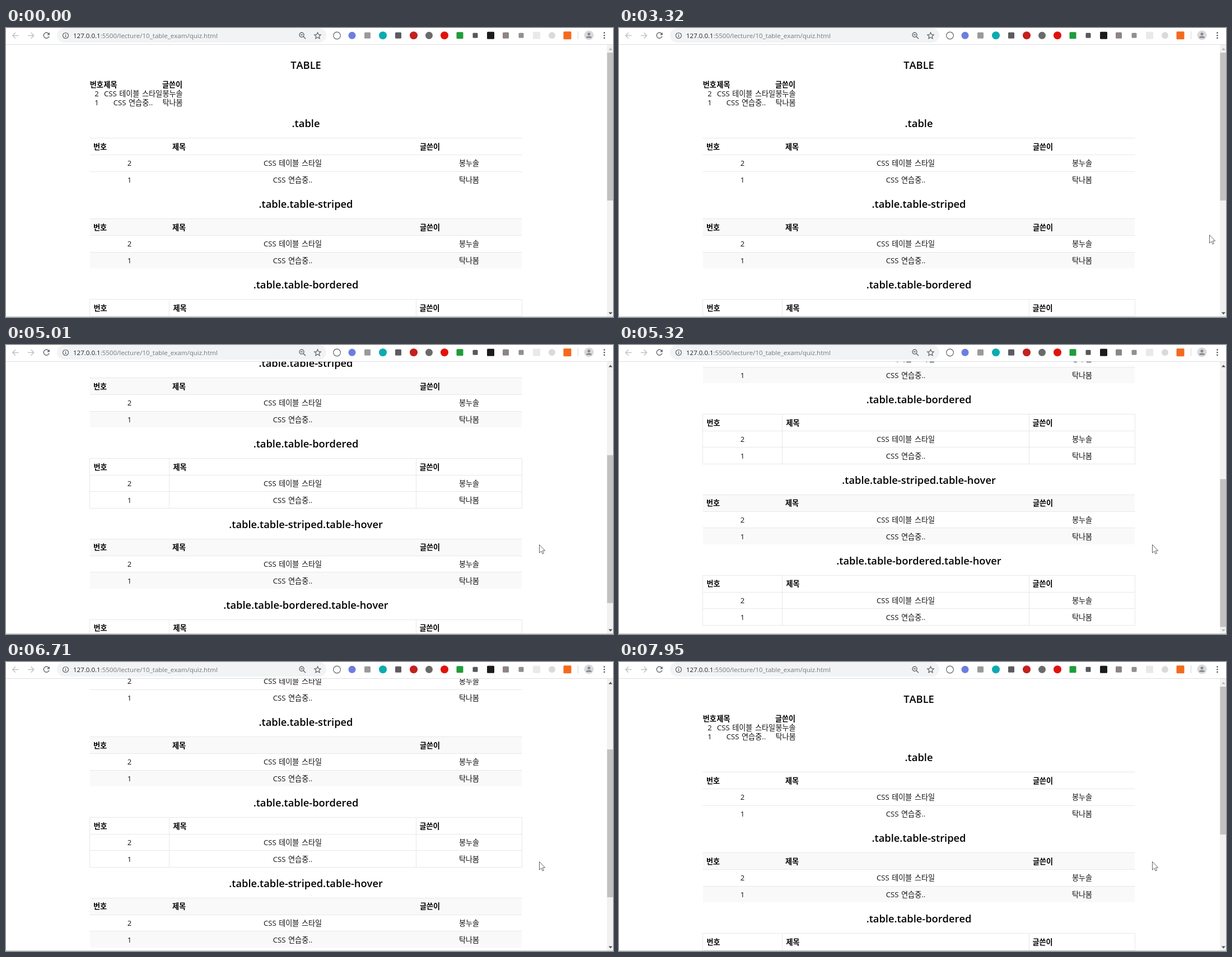
Recreate the animation shown at these times as an HTML page. Size 1084 by 516 pixels, loop 8 s.

```html
<!DOCTYPE html>
<html lang="ko">
<head>
<meta charset="utf-8">
<title>Table quiz</title>
<style>
  @property --s { syntax: "<number>"; inherits: true; initial-value: 0; }

  html, body { margin: 0; width: 100%; height: 100%; overflow: hidden; background: #fff; }
  svg {
    display: block; width: 1084px; height: 516px;
    font: 13.1px "Open Sans", "Noto Sans CJK KR", "Noto Sans CJK JP", sans-serif;
    font-kerning: none;
    fill: #111;
    animation: scroll 8s step-end -1ms infinite;
  }
  text { word-spacing: 1.2px; white-space: pre; }
  .mid { text-anchor: middle; }
  .head { font-weight: 700; fill: #000; }
  .title { font-size: 18.3px; font-weight: 600; text-anchor: middle; fill: #000; }
  .url { font-size: 11.5px; fill: #75797d; word-spacing: 0; }
  .url tspan { fill: #202124; }
  .line { fill: #e8e8e8; }
  .stripe { fill: #f9f9f9; }
  .icon { fill: none; stroke: #5f6368; stroke-width: 1.4; }
  .thin { stroke-width: 1.2; }
  .off { stroke: #bfc1c4; }

  #page { transform: translateY(calc(var(--s) * -1px)); }
  #thumb { transform: translateY(calc(var(--s) * .5415px)); }
  #up { opacity: clamp(.35, var(--s), 1); }
  #down { opacity: clamp(.35, 361 - var(--s), 1); }
  #cursor { animation: point 8s step-end -1ms infinite; }

  @keyframes scroll {
    0% { --s: 0; }
    43.375% { --s: 18; }
    44.3125% { --s: 62; }
    45.25% { --s: 112; }
    46.1875% { --s: 163; }
    47.125% { --s: 210; }
    48.0625% { --s: 243; }
    49% { --s: 257; }
    62.625% { --s: 282; }
    63.6% { --s: 309; }
    64.55% { --s: 334; }
    65.525% { --s: 353; }
    66.5% { --s: 361; }
    80.125% { --s: 346; }
    81.06% { --s: 308; }
    82% { --s: 258; }
    83% { --s: 207; }
    83.94% { --s: 169; }
    84.875% { --s: 154; }
    89.875% { --s: 143; }
    90.8125% { --s: 118; }
    91.75% { --s: 103; }
    94.625% { --s: 95; }
    95.56% { --s: 76; }
    96.5% { --s: 52; }
    97.5% { --s: 27; }
    98.44% { --s: 8; }
    99.375%, 100% { --s: 0; }
  }

  @keyframes point {
    0% { transform: translate(1100px, 392px); }
    6.75% { transform: translate(1047px, 497px); }
    7.625% { transform: translate(1031px, 456px); }
    8.5% { transform: translate(1035px, 426px); }
    13.5% { transform: translate(1036px, 416px); }
    14.4375% { transform: translate(1039px, 402px); }
    15.375% { transform: translate(1042px, 392px); }
    20.375% { transform: translate(1064px, 392px); }
    21.25% { transform: translate(1100px, 392px); }
    41.5% { transform: translate(1054px, 369px); }
    42.4375% { transform: translate(985px, 356px); }
    43.375%, 100% { transform: translate(952px, 356px); }
  }
</style>
</head>
<body>
<svg viewBox="0 0 1084 516">
  <g id="page"></g>

  <g id="scrollbar">
    <rect x="1073" y="30" width="11" height="486" fill="#f1f1f1"/>
    <rect id="thumb" x="1073.5" y="44" width="10.5" height="264" fill="#c1c1c1"/>
    <path id="up" d="M1076 39.5l3.5-4 3.5 4z" fill="#505050"/>
    <path id="down" d="M1076 507.5l3.5 4 3.5-4z" fill="#505050"/>
  </g>
  <rect y="515" width="1084" height="1" fill="#c6c6c6"/>

  <g id="toolbar">
    <rect width="1084" height="29" fill="#fff"/>
    <rect y="29" width="1084" height="1" fill="#dcdde0"/>
    <path class="icon off" d="M22.5 13.5H12M17 8.3l-5.2 5.2 5.2 5.2M39 13.5h10.5M44.5 8.3l5.2 5.2-5.2 5.2"/>
    <path class="icon" d="M76.3 10.3a5 5 0 1 0 .7 4.5"/>
    <path d="M77.8 7.8v4.7h-4.7z" fill="#5f6368"/>
    <rect x="91" y="0" width="481" height="26" rx="13" fill="#f1f3f4"/>
    <circle class="icon thin" cx="106.5" cy="13.5" r="5"/>
    <path class="icon" d="M106.5 12.8v3.4M106.5 10.5v1.3"/>
    <text class="url" x="120" y="17.5"><tspan>127.0.0.1</tspan>:5500/lecture/10_table_exam/quiz.html</text>
    <circle class="icon" cx="528" cy="12.3" r="4"/>
    <path class="icon" d="M531 15.3l4 4M526 12.3h4"/>
    <path class="icon thin" d="M556.5 8l1.7 3.7 4 .4-3 2.7.9 4-3.6-2.1-3.6 2.1.9-4-3-2.7 4-.4z"/>
    <circle class="icon thin" cx="591" cy="13.5" r="6.3"/>
    <g id="extensions"></g>
    <rect x="1021" y="6" width="1" height="14" fill="#d5d7da"/>
    <circle cx="1041" cy="13" r="8.5" fill="#d8d9dc"/>
    <circle cx="1041" cy="10.7" r="2.5" fill="#85888c"/>
    <path d="M1036 17.7q0-3.2 5-3.2t5 3.2z" fill="#85888c"/>
    <g fill="#5f6368">
      <circle cx="1068.5" cy="8.7" r="1.4"/>
      <circle cx="1068.5" cy="13.3" r="1.4"/>
      <circle cx="1068.5" cy="17.9" r="1.4"/>
    </g>
  </g>

  <path id="cursor" d="M.5.5v14.7l3.4-3.2 2.3 5 2.2-1-2.2-4.8h4.5z" fill="#fff" stroke="#505050" stroke-width=".9"/>
</svg>
<script>
  const $ = id => document.getElementById(id);
  const heads = ["번호", "제목", "글쓴이"];
  const rows = [["2", "CSS 테이블 스타일", "봉누솔"], ["1", "CSS 연습중..", "탁나봄"]];
  const styles = [".table", ".table.table-striped", ".table.table-bordered",
    ".table.table-striped.table-hover", ".table.table-bordered.table-hover"];
  const pitch = 29.6;

  const text = (x, y, str, cls) => `<text x="${x}" y="${y}" class="${cls}">${str}</text>`;
  const rect = (x, y, w, h, cls) => `<rect x="${x}" y="${y}" width="${w}" height="${h}" class="${cls}"/>`;

  // Header is left aligned, body cells are centred.
  function cells(left, centre, y, step) {
    return heads.map((h, i) => text(left[i], y, h, "head")).join("") +
      rows.map((row, r) => row.map((c, i) =>
        text(centre[i], y + step * (r + 1), c, "mid")).join("")).join("");
  }

  function table(name, k) {
    const top = 196.4 + 143.9 * k;
    const edge = i => Math.round(top + pitch * i);
    const bordered = name.includes("bordered");
    let out = text(535.5, Math.round(177 + 143.9 * k), name, "title");
    if (name.includes("striped")) {
      for (const i of [0, 2]) out += rect(150, edge(i), 771, edge(i + 1) - edge(i), "stripe");
    }
    for (let i = 0; i < (bordered ? 4 : 3); i++) out += rect(149.5, edge(i), 772, 1, "line");
    if (bordered) {
      for (const x of [149, 291, 732, 921]) out += rect(x, edge(0), 1, edge(3) - edge(0) + 1, "line");
    }
    const left = bordered ? [156.5, 298.5, 738.5] : [156, 297, 739];
    return out + cells(left, [220.5, 512, 827], top + 20.3, pitch);
  }

  $("page").innerHTML = text(535.5, 73, "TABLE", "title") +
    cells([149.7, 174.5, 279], [162, 227, 297.5], 105.7, 16.3) +
    styles.map(table).join("");

  // [centre x, size, colour, round]
  const marks = [
    [618, 13, "#6b7ee0", 1], [645.5, 11, "#9a9a9a", 0], [673, 14, "#0cabaf", 1],
    [700.5, 11, "#5c5c60", 0], [728, 14, "#c4201d", 1], [755.5, 13, "#6a6a6a", 1],
    [783, 14, "#e0130c", 1], [810.5, 12, "#1f9d3a", 0], [838, 9, "#55595d", 0],
    [865.5, 13, "#1b1b1b", 0], [892.5, 11, "#8d8583", 0], [920, 9, "#909090", 0],
    [947.5, 13, "#e9e9e9", 0], [975, 12, "#dadada", 1], [1002.5, 14, "#f36a1d", 0]
  ];
  $("extensions").innerHTML = marks.map(([x, d, fill, round]) =>
    `<rect x="${x - d / 2}" y="${13.3 - d / 2}" width="${d}" height="${d}" rx="${round ? d / 2 : 1.5}" fill="${fill}"/>`).join("");
</script>
</body>
</html>
```
